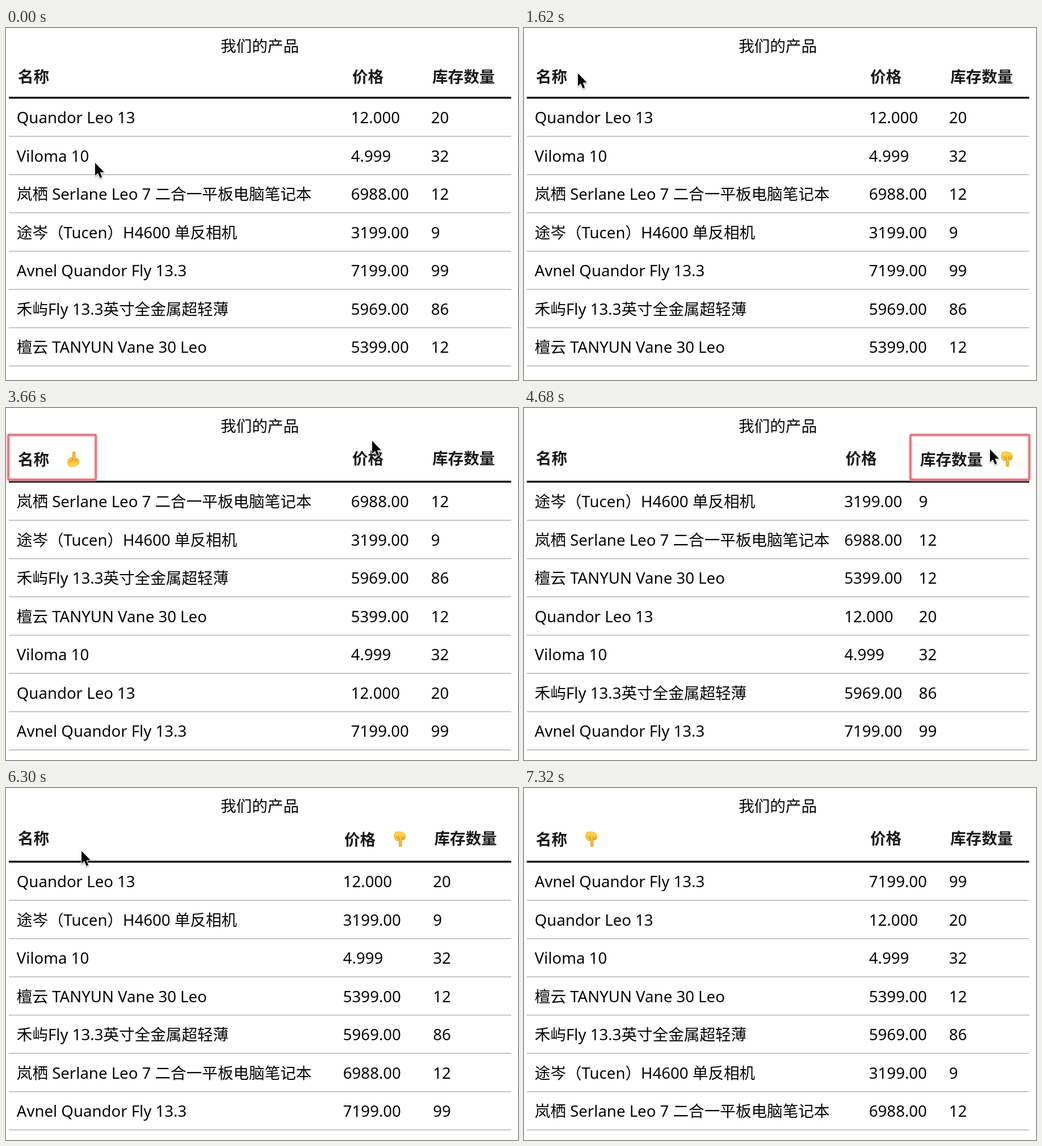
An HTML page for the animation above (7.44 s loop, 902 by 621 pixels).

```html
<!DOCTYPE html>
<html lang="zh-CN">
<head>
<meta charset="utf-8">
<title>我们的产品</title>
<style>
  html, body { margin: 0; width: 100%; height: 100%; overflow: hidden; background: #fff; }
  svg { display: block; width: 902px; height: 621px; }
  text { font: 27.6px "Noto Sans", "Noto Sans CJK SC", "Noto Sans SC", "Noto Sans CJK", sans-serif; fill: #050505; white-space: pre; }
  .head { font-weight: 700; fill: #1a1a1a; }
</style>
</head>
<body>
<svg viewBox="0 0 902 621">
  <defs>
    <linearGradient id="skin" x2="0" y2="1">
      <stop offset="0" stop-color="#ffd84a"/>
      <stop offset="1" stop-color="#f6b026"/>
    </linearGradient>
    <filter id="soft" x="-50%" y="-50%" width="200%" height="200%">
      <feDropShadow dx="0" dy="1.5" stdDeviation="1.3" flood-opacity=".4"/>
    </filter>
    <filter id="glow" x="-10%" y="-20%" width="120%" height="140%">
      <feGaussianBlur stdDeviation="1"/>
    </filter>
  </defs>
  <rect width="902" height="621" fill="#fff"/>
  <text x="378" y="42">我们的产品</text>
  <rect id="hover" x="5" width="885" height="66.5" fill="#e6e6e6"/>
  <g id="table"></g>
  <g id="ring" fill="none">
    <rect y="47.5" height="79" rx="2" stroke="#f0a5a9" stroke-width="5" filter="url(#glow)"/>
    <rect y="47.5" height="79" rx="1.5" stroke="#e2747a" stroke-width="3"/>
  </g>
  <g id="hand">
    <path d="M5 1.5 Q12 -.5 18 2 Q23 4.5 23 9.500 Q23 14.500 19.500 15 L16.500 15 L16.500 24.500 Q16.500 27 14 27 Q11.500 27 11.500 24.500 L11.500 16 Q8 17.500 5.500 15 Q2.500 12 3 7 Z" fill="url(#skin)" stroke="#dc9a27" stroke-width=".7"/>
    <path d="M11.500 16 V10.500 Q8 11.500 6 8.500 M16.500 15 V9 M19.800 14.500 V9" fill="none" stroke="#bd7b1d" stroke-width="1"/>
  </g>
  <path id="cursor" d="M0 0V22.500L5 17.800L8.600 26.400L12.200 24.900L8.700 16.500L15.800 16.200Z" fill="#000" stroke="#fff" stroke-width="2" stroke-linejoin="round" paint-order="stroke" filter="url(#soft)"/>
</svg>
<script>
const LOOP = 7440, STEP = 60, PITCH = 67.5;
const $ = id => document.getElementById(id);

const heads = { name: '名称', price: '价格', stock: '库存数量' };
// rank is the place in the ascending name order
const items = [
  ['Quandor Leo 13', '12.000', 20, 1],
  ['Viloma 10', '4.999', 32, 2],
  ['岚栖 Serlane Leo 7 二合一平板电脑笔记本', '6988.00', 12, 6],
  ['途岑（Tucen）H4600 单反相机', '3199.00', 9, 5],
  ['Avnel Quandor Fly 13.3', '7199.00', 99, 0],
  ['禾屿Fly 13.3英寸全金属超轻薄', '5969.00', 86, 4],
  ['檀云 TANYUN Vane 30 Leo', '5399.00', 12, 3]
].map(([name, price, stock, rank]) => ({ name, price, stock, rank }));

const compare = {
  name: (a, b) => a.rank - b.rank,
  price: (a, b) => a.price < b.price ? -1 : 1,
  stock: (a, b) => a.stock - b.stock
};

// Column origins (header text) for each sorted column
const columns = {
  name: { name: 21, price: 610, stock: 751 },
  price: { name: 21, price: 596, stock: 754.5 },
  stock: { name: 21, price: 566.5, stock: 697.8 }
};

// time, sorted column, direction
const clicks = [
  [2040, 'name', 1], [3060, 'name', -1],
  [4020, 'price', 1], [4260, 'price', -1],
  [4560, 'stock', 1], [5160, 'stock', -1],
  [5640, 'price', 1], [6540, 'name', 1]
];
const views = [{ at: 0, key: null, dir: 1, rows: items }];
for (const [at, key, dir] of clicks) {
  const rows = [...views[views.length - 1].rows].sort((a, b) => dir * compare[key](a, b));
  views.push({ at, key, dir, rows });
}

// time, focused column
const focus = [
  [0, null], [1980, 'name'], [3960, 'price'], [4500, 'stock'],
  [5580, 'price'], [6000, null], [6480, 'name'], [6900, null]
];

// time, x, y of the pointer tip
const path = [
  [0, 156, 238], [120, 156, 238], [300, 168, 256], [480, 190, 280], [660, 200, 290],
  [780, 200, 290], [840, 196, 253], [900, 140, 118], [960, 100, 94], [1200, 100, 94],
  [1620, 94, 80], [1980, 84, 86], [2160, 84, 86], [2400, 92, 80], [2940, 88, 84],
  [3120, 86, 86], [3360, 260, 66], [3660, 644, 58], [3840, 636, 86], [4020, 632, 88],
  [4200, 632, 88], [4440, 700, 80], [4680, 820, 73], [4980, 812, 84], [5160, 810, 88],
  [5400, 740, 92], [5640, 640, 88], [5760, 636, 90], [5940, 520, 100], [6300, 132, 111],
  [6480, 70, 92], [6600, 70, 92], [6840, 150, 200], [7080, 230, 400], [7260, 300, 630],
  [LOOP, 300, 630]
];

const last = (list, test) => list.filter(test).pop();

function pointer(t) {
  const i = Math.max(1, path.findIndex(p => p[0] >= t));
  const [t0, x0, y0] = path[i - 1], [t1, x1, y1] = path[i];
  const k = (t - t0) / (t1 - t0);
  return [x0 + (x1 - x0) * k, y0 + (y1 - y0) * k];
}

const label = (x, y, s, cls = '') => `<text x="${x}" y="${y}" class="${cls}">${s}</text>`;
const line = (y, h, color) => `<rect x="5" y="${y - h / 2}" width="885" height="${h}" fill="${color}"/>`;
const textWidth = key => heads[key].length * 27.6;

let shown = null;
function drawTable(view) {
  if (view === shown) return;
  shown = view;
  const { key, dir, rows } = view;
  const cols = columns[key || 'name'];
  const top = key ? 130 : 123;
  let out = '';
  for (const k in heads) {
    out += label(cols[k], !key ? 95.5 : k === key ? 101 : 99, heads[k], 'head');
  }
  rows.forEach((row, i) => {
    const y = top + 45 + i * PITCH;
    for (const k in heads) out += label(cols[k] - 2.2, y, row[k]);
    out += line(top + 68.2 + i * PITCH, 1.6, '#b9b9b9');
  });
  $('table').innerHTML = out + line(top, 3.2, '#000');

  $('hand').style.display = key ? '' : 'none';
  if (key) {
    const x = cols[key] + textWidth(key) + 29.500;
    $('hand').setAttribute('transform', dir > 0
      ? `translate(${x} 76.500)`
      : `translate(${x} 104) scale(1 -1)`);
  }
}

function drawRing(key, view) {
  $('ring').style.display = key ? '' : 'none';
  if (!key) return;
  const x = columns[view.key || 'name'][key] - 17;
  for (const r of $('ring').children) {
    r.setAttribute('x', x);
    r.setAttribute('width', textWidth(key) + 99);
  }
}

function drawHover(t, view) {
  const top = view.key ? 130 : 123;
  // the highlight trails the pointer by one step
  const row = t < 180 ? -1 : Math.floor((pointer(t - STEP)[1] - top - .5) / PITCH);
  const on = row >= 0 && row < items.length;
  $('hover').style.display = on ? '' : 'none';
  if (on) $('hover').setAttribute('y', top + 1.2 + row * PITCH);
}

function render(now) {
  const t = Math.floor(now % LOOP / STEP) * STEP;
  const view = last(views, v => v.at <= t);
  drawTable(view);
  drawRing(last(focus, f => f[0] <= t)[1], view);
  drawHover(t, view);
  const [x, y] = pointer(t);
  $('cursor').setAttribute('transform', `translate(${x + 1} ${y})`);
}

const start = performance.now();
function tick() {
  render(performance.now() - start);
  requestAnimationFrame(tick);
}
tick();
</script>
</body>
</html>
```
